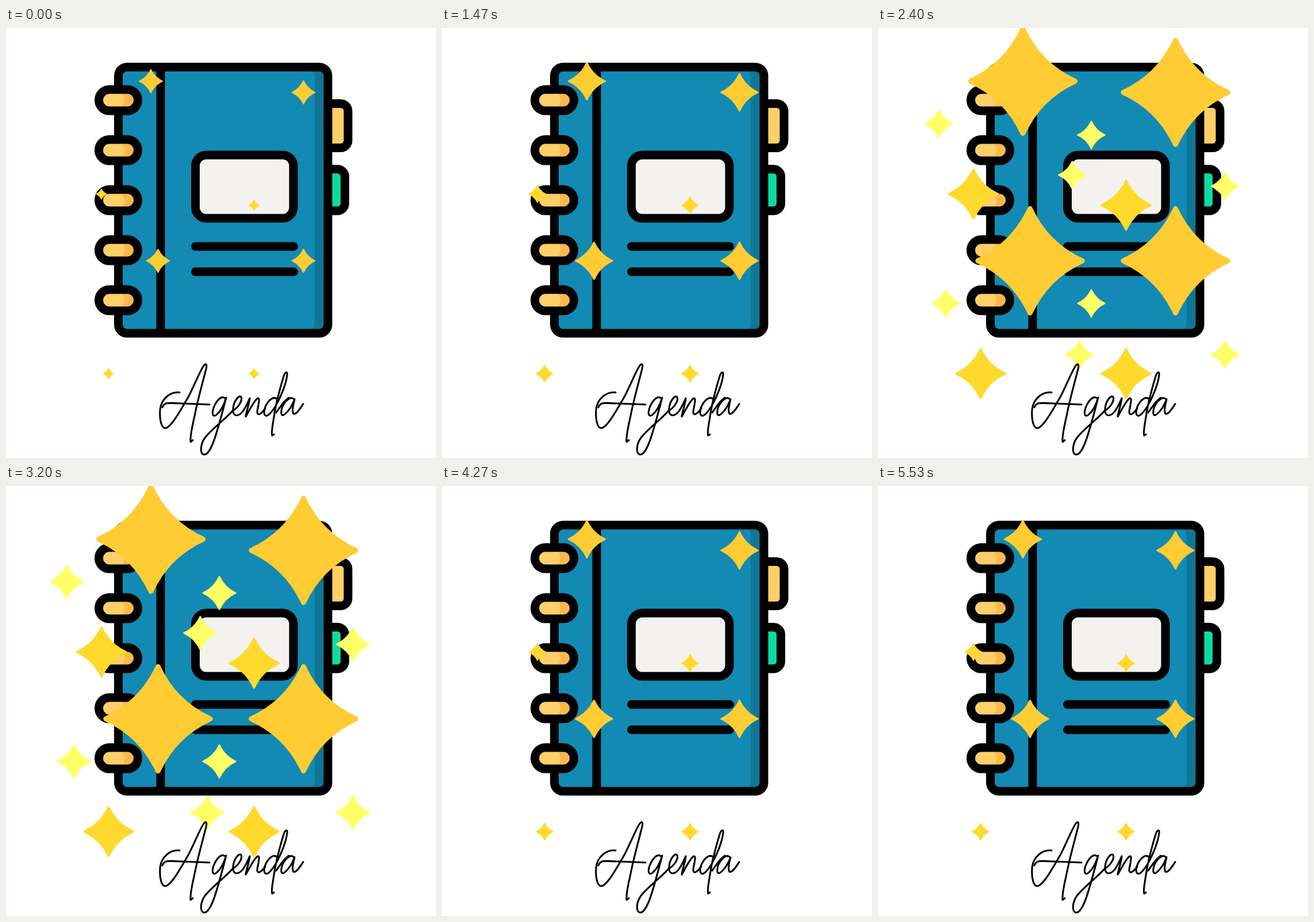
An HTML page for the animation above (5590 ms loop, 748 by 748 pixels).

```html
<!DOCTYPE html>
<html lang="en">
<head>
<meta charset="utf-8">
<title>Agenda</title>
<style>
  html, body { margin: 0; width: 100%; height: 100%; overflow: hidden; background: #fff; }
  svg { display: block; width: 100vw; height: 100vh; }
  .ink { stroke: #000; stroke-width: 15; }
  .pen { fill: none; stroke: #000; stroke-width: 3.1; stroke-linecap: round; stroke-linejoin: round; }
</style>
</head>
<body>
<svg viewBox="0 0 748 748" role="img" aria-label="Agenda">
  <defs>
    <path id="star" stroke-width=".09" stroke-linejoin="round"
      d="M0-.955Q.3-.3 .955 0Q.3 .3 0 .955Q-.3 .3-.955 0Q-.3-.3 0-.955Z"/>
    <g id="ring">
      <rect x="161.5" y="-18.5" width="68" height="37" rx="18.5" fill="#ffcf68"/>
      <path d="M203-11H211A11 11 0 0 1 211 11H203Q209 0 203-11Z" fill="#fbb84c"/>
      <rect class="ink" x="161.5" y="-18.5" width="68" height="37" rx="18.5" fill="none"/>
    </g>
  </defs>

  <rect class="ink" x="540" y="131.5" width="55" height="77" rx="13" fill="#ffcf68"/>
  <rect class="ink" x="540" y="245.5" width="49.5" height="72.5" rx="13" fill="#0ddba2"/>

  <rect x="195.5" y="68" width="364.5" height="463" rx="15" fill="#128ab4"/>
  <path d="M534 75H545Q553 75 553 85V514Q553 524 545 524H532Q537 520 537 510V87Q537 80 534 75Z" fill="#0f7795"/>
  <rect class="ink" x="195.5" y="68" width="364.5" height="463" rx="15" fill="none"/>
  <path class="ink" d="M269 68V531"/>
  <rect class="ink" x="329.5" y="221" width="170.5" height="110" rx="19" fill="#f4f2ee"/>
  <path class="ink" stroke-linecap="round" d="M329.5 380H500.5M329.5 424H500.5"/>
  <g id="rings"></g>
  <g id="stars"></g>

  <g class="pen">
    <path d="M302 634C286 632 270 645 268 664C267 681 270 696 277 696C287 695 302 668 317 642C328 622 338 594 345 586C349 582 350 588 347 597C342 617 334 645 329 670C325 690 320 707 321 720L325 717"/>
    <path d="M272 660C276 649 288 653 302 653L354 655"/>
    <path d="M381 644C374 638 365 650 361 661C357 673 361 678 367 672C374 666 380 653 383 643C378 662 371 690 363 714C357 732 350 743 344 742C337 740 338 724 346 713C357 698 380 682 394 666"/>
    <path d="M394 666C403 661 412 649 409 642C405 637 396 650 395 662C394 675 402 677 410 669C416 663 420 653 424 644C423 655 418 667 417 676C424 664 432 647 438 644C443 643 438 659 437 667C437 677 445 670 451 662"/>
    <path d="M472 646C465 638 454 650 450 662C447 674 452 678 459 671C472 658 487 622 489 604C490 597 486 597 483 606C476 629 469 656 466 677C464 691 461 703 463 709L466 707"/>
    <path d="M470 669C476 661 483 648 492 643M500 645C494 640 484 650 480 661C477 672 480 677 486 671C493 665 498 656 502 646C499 657 497 667 500 671C505 673 511 663 517 654"/>
  </g>
</svg>
<script>
const LOOP = 5590, STEP = 200 / 3, CYCLE = 21;

// Gold stars pulse twice per cycle, pale ones flash once and vanish in between.
const twinkle = step => 21 + 77 * Math.abs(Math.sin(2 * Math.PI * step / CYCLE)) ** 1.5;
const flash = step => Math.max(0, 21 + 28 * Math.cos(2 * Math.PI * (step - 10.2) / CYCLE));

// One cluster of stars, repeated at four places.
const cluster = [
  { x: -86, y: 196.3, color: '#ffd92b', size: step => 0.465 * twinkle(step) },
  { x: 0, y: 0, color: '#ffcc33', size: twinkle },
  { x: -146.4, y: 74.1, color: '#ffff66', size: flash },
  { x: 85.9, y: 163.3, color: '#ffff66', size: flash }
];
const places = [[252, 92.5], [517.5, 112], [264.5, 405], [517.5, 405]];

function addUse(parent, id, attrs) {
  const node = document.createElementNS('http://www.w3.org/2000/svg', 'use');
  node.setAttribute('href', '#' + id);
  for (const name in attrs) node.setAttribute(name, attrs[name]);
  return parent.appendChild(node);
}

const rings = document.getElementById('rings');
for (let i = 0; i < 5; i++) addUse(rings, 'ring', { y: 125.5 + 87 * i });

const layer = document.getElementById('stars');
const stars = places.flatMap(([left, top]) => cluster.map(({ x, y, color, size }) => ({
  x: left + x, y: top + y, size,
  node: addUse(layer, 'star', { fill: color, stroke: color })
})));

function draw(time) {
  const step = Math.floor((time % LOOP + 5) / STEP) % CYCLE;
  for (const { x, y, size, node } of stars) {
    const radius = size(step);
    node.setAttribute('visibility', radius > 0 ? 'visible' : 'hidden');
    node.setAttribute('transform', `translate(${x} ${y}) scale(${radius})`);
  }
}

const start = performance.now();
function tick(now) {
  draw(Math.max(0, now - start));
  requestAnimationFrame(tick);
}
draw(0);
requestAnimationFrame(tick);
</script>
</body>
</html>
```
